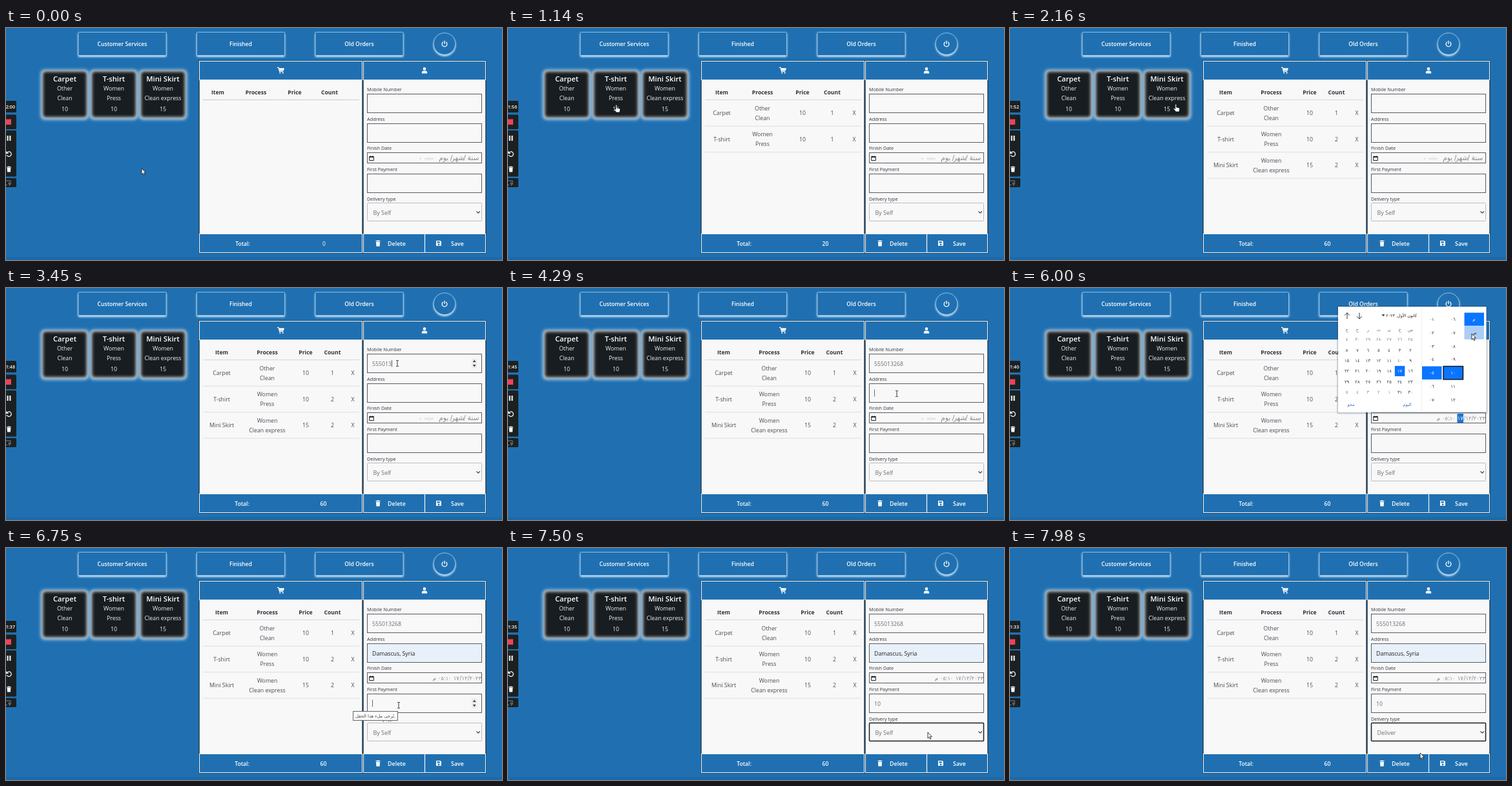
These frames come from a looping animation (768x360 px, 8000 ms). An HTML page:

```html
<!DOCTYPE html>
<html lang="en">
<head>
<meta charset="utf-8">
<title>Laundry order</title>
<style>
html, body { margin: 0; width: 100%; height: 100%; overflow: hidden; background: #2070b1; }
svg { display: block; width: 768px; height: 360px; font-family: 'Open Sans', 'Noto Sans', sans-serif; }
.ar { font-family: 'DejaVu Sans', sans-serif; }
.btn { fill: #2070b1; stroke: #a5cdec; stroke-width: .8; filter: drop-shadow(.8px 2px 1.8px #d3ebfc); }
.halo { fill: #bfe1f8; filter: blur(2.6px); }
.rim { fill: #bdb8b5; filter: blur(1.2px); }
.core { fill: #171d20; filter: blur(2.2px); }
.shade { fill: none; stroke: #26384a; filter: blur(1px); }
</style>
</head>
<body>
<svg viewBox="0 0 768 360" xmlns="http://www.w3.org/2000/svg">
  <g id="base"></g>
  <g id="live"></g>
</svg>
<script>
const LOOP = 8000;
const BLUE = '#2070b1', PAPER = '#f8f8f9', INK = '#4a4d52', DARK = '#1b2123', PICK = '#0a75ff';
const PHONE = '555013268';

// Markup helpers; y is the visual middle of the line
const text = (x, y, s, size, fill, o = {}) =>
  `<text x="${x}" y="${(y + size * 0.36).toFixed(2)}" font-size="${size}" fill="${fill}" ` +
  `font-weight="${o.w || 400}" text-anchor="${o.a || 'middle'}" class="${o.c || ''}">${s}</text>`;
const arab = (x, y, s, size, fill = '#333', a = 'middle') => text(x, y, s, size, fill, { c: 'ar', a });
const rect = (x, y, w, h, fill, more = '') =>
  `<rect x="${x}" y="${y}" width="${w}" height="${h}" fill="${fill}" ${more}/>`;
const path = (d, more) => `<path d="${d}" ${more}/>`;
const at = (x, y, body, k = 1) => `<g transform="translate(${x} ${y}) scale(${k})">${body}</g>`;
const line = (x1, y1, x2, y2, stroke, w = 1) => path(`M${x1} ${y1}L${x2} ${y2}`, `stroke="${stroke}" stroke-width="${w}"`);
const digits = (n, pad = 1) =>
  String(n).padStart(pad, '0').replace(/\d/g, d => String.fromCharCode(0x660 + +d));

const trash = path('M-4-4.4h2.4l.6-.8h2l.6.8h2.4v1.2h-8zM-3.4-2.6h6.8l-.5 7.2q0 .7-.8.7h-4.2q-.8 0-.8-.7z', 'fill="#fff"');
const icons = {
  cart: path('M-5.5-4.5h2l1.6 6.2h5.6', 'fill="none" stroke="#fff" stroke-width="1.2"') +
    path('M-3-3.6h8.5l-1.3 4.4h-6.1z', 'fill="#fff"') +
    '<circle cx="-1.2" cy="3.8" r="1.1" fill="#fff"/><circle cx="3.2" cy="3.8" r="1.1" fill="#fff"/>',
  user: '<circle cy="-2.4" r="2.3" fill="#fff"/>' + path('M-4.2 4.6v-1q0-2.8 2.8-2.8h2.8q2.8 0 2.8 2.8v1z', 'fill="#fff"'),
  disk: path('M-4-4h6.4l1.6 1.6v6.4h-8zM-2.6-2.8v2.2h4.4v-2.2zM0 .6a1.4 1.4 0 1 0 .01 0z', 'fill="#fff" fill-rule="evenodd"'),
  power: path('M-2.5-2.8a3.9 3.9 0 1 0 5 0M0-4.6v4.2', 'fill="none" stroke="#fff" stroke-width="1.3" stroke-linecap="round"'),
  undo: path('M-3.2-1.6a3.7 3.7 0 1 1-.2 3M-3.8-4.2v3h3', 'fill="none" stroke="#fff" stroke-width="1.2"'),
  date: path('M-3.3-2.8h6.6v6h-6.6zM-1.8-4v1.4M1.8-4v1.4', 'fill="none" stroke="#222"') + rect(-3.3, -3, 6.6, 1.6, '#222'),
};

const items = [
  { name: 'Carpet', kind: 'Other', job: 'Clean', price: 10, x: 91, clicks: [640] },
  { name: 'T-shirt', kind: 'Women', job: 'Press', price: 10, x: 167, clicks: [1080, 1300] },
  { name: 'Mini Skirt', kind: 'Women', job: 'Clean express', price: 15, x: 243, clicks: [1760, 1980] },
];

function button(cx, label) {
  return rect(cx - 68, 6.5, 136, 36, BLUE, 'rx="1" class="btn"') +
    text(cx, 24.5, label, 8.65, '#fff', { w: 600 });
}

function card({ x, name, kind, job, price }) {
  return rect(x - 37, 65, 74, 77, '', 'rx="6" class="halo"') +
    rect(x - 35.5, 66, 71, 74, '', 'rx="5" class="rim"') +
    rect(x - 33.5, 68, 67, 70, '', 'rx="4" class="core"') +
    text(x, 79, name, 11.2, '#fff', { w: 600 }) +
    [[kind, 93.5], [job, 108.5], [price, 125.5]].map(([s, y]) => text(x, y, s, 8.85, '#f2f2f2')).join('');
}

function panel(x, w) {
  const edge = 'stroke="#f4f8fb" stroke-width="1"';
  return rect(x - .3, 50.7, w + .6, 298.6, 'none', 'stroke="#1c3d5a" stroke-width=".8"') +
    rect(x + .4, 80, w - .8, 240, PAPER, 'stroke="#50555a" stroke-width=".8"') +
    rect(x + .5, 51.5, w - 1, 29, BLUE, edge) +
    rect(x + .5, 319.5, w - 1, 29, BLUE, edge);
}

function toolbar() {
  const bar = (y, h) => rect(-6, y, 22, h, DARK, 'rx="1.5"');
  return bar(113, 18) + bar(134.5, 22.5) + bar(159, 71.5) + bar(233, 14) +
    rect(-1, 141.5, 9, 8.5, '#f0415a') +
    rect(1.6, 167, 2, 8, '#fff') + rect(5.4, 167, 2, 8, '#fff') +
    at(4.5, 195.5, icons.undo) + at(4.5, 219, trash, .85) +
    path('M-1 237h8v3M-1 243.5h3M4 240l4 1.6-2 .8-.6 2z', 'fill="none" stroke="#8b9090" stroke-width=".9"');
}

const fieldBox = (y, h, fill = PAPER) => rect(559.5, y, 177, h, fill, 'stroke="#595c60" stroke-width="1"');

function drawBase() {
  const labels = { 'Mobile Number': 95.5, 'Address': 141, 'Finish Date': 186.5, 'First Payment': 219, 'Delivery type': 265 };
  return rect(0, 0, 768, 360, BLUE) + rect(0, 355.5, 768, 4.5, '#1d69a8') +
    button(180, 'Customer Services') + button(363.5, 'Finished') + button(547, 'Old Orders') +
    '<circle cx="679" cy="24.5" r="16.8" class="btn"/>' + at(679, 24.8, icons.power) +
    items.map(card).join('') + toolbar() +
    panel(299, 253) + panel(553, 190) +
    at(425.5, 65.8, icons.cart) + at(648, 65.8, icons.user) +
    line(648.5, 320, 648.5, 348, '#f4f8fb', 1.2) +
    at(576, 334, trash, .9) + text(605, 334.5, 'Delete', 8.9, '#fff', { w: 600 }) +
    at(670, 334, icons.disk) + text(699, 334.5, 'Save', 8.9, '#fff', { w: 600 }) +
    Object.entries(labels).map(([s, y]) => text(559, y, s, 7.35, '#30343a', { a: 'start' })).join('') +
    fieldBox(102.5, 29) + fieldBox(148.5, 29) + fieldBox(193.5, 16) + fieldBox(226.5, 29) +
    at(566, 202.3, icons.date);
}

const layouts = [[328, 387, 447, 501, 0], [329, 390, 453, 501, 536], [331, 394, 456, 502, 536], [334, 404.5, 464, 505.5, 537]];

function drawCart(t) {
  const rows = items.map(i => ({ ...i, n: i.clicks.filter(c => t >= c).length })).filter(i => i.n);
  const cols = layouts[rows.length];
  const total = rows.reduce((sum, r) => sum + r.n * r.price, 0);
  let out = ['Item', 'Process', 'Price', 'Count']
    .map((s, i) => text(cols[i], 99.5, s, 8.6, '#2f3338', { w: 700 })).join('');
  out += line(305, 111.5, 547, 111.5, rows.length ? '#d4d7da' : '#c9ccd0');
  rows.forEach((r, i) => {
    const y = 132 + i * 40.4;
    const cell = (c, dy, s) => text(cols[c], y + dy, s, 8.75, INK);
    out += cell(0, 0, r.name) + cell(1, -7.2, r.kind) + cell(1, 7.8, r.job) +
      cell(2, 0, r.price) + cell(3, 0, r.n) + cell(4, 0, 'X') +
      line(305, y + 20.3, 547, y + 20.3, '#dcdee1');
  });
  const dx = rows.length ? -1 : 0;
  return out + text(366.5 + dx, 334.5, 'Total:', 8.6, '#fff', { w: 600 }) +
    text(492.5 + dx, 334.5, total, 8.6, '#fff', { w: rows.length ? 600 : 400 });
}

const within = (t, a, b) => t >= a && t < b;
const typed = (s, t, start, step) => s.slice(0, Math.max(0, Math.floor((t - start) / step)));
const caret = (x, y) => line(x, y - 5.5, x, y + 5.5, '#444', .8);
const spinner = y => rect(721, y - 7.5, 8.5, 15, '#ececee') +
  path(`M722.8 ${y - 2}l2.4-3.6 2.4 3.6zM722.8 ${y + 2}l2.4 3.6 2.4-3.6z`, 'fill="#444"');

function drawDate(t) {
  const grey = '#85878a', y = 202, size = 8.6;
  const picking = t < 6380;
  let out = '';
  if (t >= 5450) {
    if (picking) out += rect(692.5, 195, 9.5, 14, '#1a72d2');
    out += arab(736, y, `/${digits(12)}/${digits(2023)}`, size, grey, 'end') +
      arab(697.3, y, digits(17), size, picking ? '#fff' : grey);
  } else {
    const on = t >= 4930;
    if (on) out += rect(667.5, 195, 20.5, 14, '#1a72d2');
    out += [['سنة', 723.5], ['/', 710], ['شهر', 699.5], ['/', 689.5]].map(([s, x]) => arab(x, y - .5, s, 10.6, grey)).join('') +
      arab(677.7, y - .5, 'يوم', 10.6, on ? '#fff' : grey);
  }
  return out + (t >= 5860
    ? arab(689.5, y, `${digits(5, 2)}:${digits(10)}`, 8.2, grey, 'end') + arab(663.5, y - .5, 'م', 8.6, grey)
    : arab(655, y, '--:--', 7.6, grey) + arab(641.5, y, '-', 7.6, grey));
}

function drawForm(t) {
  const entry = (y, s) => text(567, y, s, 8.75, '#6a6d71', { a: 'start' });
  const phone = typed(PHONE, t, 2780, 110);
  const paid = typed('10', t, 6860, 110);
  let out = entry(117.5, phone) + entry(241.5, paid) + drawDate(t);
  if (within(t, 2720, 4110)) out += caret(567.5 + phone.length * 5, 117) + spinner(117);
  if (within(t, 4110, 4500)) out += caret(567.5, 163);
  if (t >= 4500) out += fieldBox(148.5, 29, '#e8f0fa') + text(567, 163.5, 'Damascus, Syria', 8.75, '#222', { a: 'start' });
  if (within(t, 6560, 7430)) out += caret(567.5 + paid.length * 5, 241) + spinner(241);
  const focus = t >= 7430;
  out += rect(559.5, 271.5, 177, 28, PAPER, `rx="1" stroke="${focus ? '#1c1e20' : '#b9bcbf'}" stroke-width="${focus ? 1.5 : 1}"`) +
    text(568.5, 286.5, t < 7780 ? 'By Self' : 'Deliver', 8.9, '#6a6d71', { a: 'start' }) +
    path('M728.5 284.5l2.7 2.7 2.7-2.7', 'fill="none" stroke="#444" stroke-width="1.2"');
  if (within(t, 6650, 7000)) {
    out += rect(537.5, 253.5, 69, 14, '#fcfcfc', 'stroke="#666" stroke-width="1"') +
      arab(572, 260.5, 'يُرجى ملء هذا الحقل.', 6.8, '#444');
  }
  return out;
}

function drawPicker(t, cur) {
  if (!within(t, 5030, 6380)) return '';
  const fade = Math.min(1, Math.max(0, (t - 5050) / 90));
  const shade = rect(508, 29.5, 229.5, 164, '', `class="shade" stroke-width="2" opacity="${.16 + fade * .3}"`);
  let out = rect(508, 29, 229.5, 164, '#fff') +
    path('M522 48v-9.5m-3.8 4l3.8-4 3.8 4M541 38.5v9.5m-3.8-4l3.8 4 3.8-4', 'fill="none" stroke="#333" stroke-width="1"') +
    path('M575.5 41h5l-2.5 3z', 'fill="#333"') +
    arab(630, 42.5, `كانون الأول, ${digits(2023)}`, 6.4, '#222', 'end') +
    line(637.5, 30, 637.5, 193, '#f0f0f0');
  [...'سحنثرخج'].forEach((s, i) => out += arab(620 - i * 16.4, 64.5, s, 6.6, '#666'));
  for (let i = 0; i < 42; i++) {
    const n = i < 6 ? 25 + i : i < 37 ? i - 5 : i - 36;
    const x = 620 - (i % 7) * 16.4, y = 80 + Math.floor(i / 7) * 16.3;
    const on = n === 17 && t >= 5450;
    if (on) out += rect(x - 7.8, y - 8, 15.5, 16, PICK);
    out += arab(x, y, digits(n), 6.8, on ? '#fff' : i < 6 || i > 36 ? '#888' : '#333');
  }
  out += arab(615, 180.5, 'اليوم', 6.4, '#2a6fc4') + arab(528, 180.5, 'محو', 6.4, '#2a6fc4');
  const slot = (x, y, s, on, more = '') => (on ? rect(x - 15, y - 10.2, 30.5, 20.4, on, more) : '') +
    arab(x, y, s, 7, on === PICK ? '#fff' : '#333');
  for (let i = 0; i < 7; i++) {
    const y = 48.5 + i * 20.8;
    out += slot(653, y, digits(i + 1, 2), i === 4 && t >= 5700 && PICK) +
      slot(686, y, digits(i + 6, 2), i === 4 && t >= 5860 && PICK, 'stroke="#111" stroke-width="1.4"');
  }
  const hover = cur.x > 703 && within(cur.y, 59, 80);
  out += slot(718.5, 48.5, 'م', PICK) + slot(718.5, 69.5, 'ص', hover && '#a9cdf6');
  return shade + `<g opacity="${fade}">${out}</g>`;
}

// Pointer stops: time, x, y
const stops = [
  [0, 210, 218], [150, 210, 218], [540, 97, 118], [740, 97, 118], [980, 168, 119], [1400, 168, 119],
  [1650, 257, 118], [2230, 257, 118], [2680, 606, 117], [3850, 606, 117], [4080, 602, 164], [4650, 602, 164],
  [4860, 567, 202], [4950, 567, 202], [5040, 573, 221], [5380, 606, 128], [5480, 606, 128], [5640, 655, 131],
  [5720, 655, 131], [5820, 688, 131], [5880, 688, 131], [5985, 715, 71], [6200, 715, 71], [6520, 608, 244],
  [7130, 608, 244], [7380, 650, 286], [7540, 650, 286], [7720, 625, 310], [7800, 625, 310], [7970, 635, 318],
];

function pointer(t) {
  const i = stops.findIndex(s => s[0] > t);
  if (i < 0) return { x: 635, y: 318 };
  const [a, ax, ay] = stops[i - 1], [b, bx, by] = stops[i];
  const u = (t - a) / (b - a), e = u * u * (3 - 2 * u);
  return { x: ax + (bx - ax) * e, y: ay + (by - ay) * e };
}

function drawPointer(t, { x, y }) {
  const picking = within(t, 5050, 6380) && x > 508 && y < 193;
  const onCard = within(y, 66, 140) && items.some(i => Math.abs(x - i.x) < 36);
  const onField = !picking && within(x, 559, 737) && (within(y, 102, 132) || within(y, 148, 178) || within(y, 226, 256));
  const pen = 'fill="#fff" stroke="#111" stroke-width=".8" stroke-linejoin="round"';
  if (onCard) return at(x, y, path('M-1.2 1q0-1 1-1t1 1v4l4 1q1 .3 .9 1.4l-.7 4.6h-5.2l-3.6-4.6q-.4-1.2 1-1l1.6 1.2z', pen));
  if (onField) return at(x, y, path('M-2-4.5h1.4l.6.6.6-.6h1.4M0-4v8M-2 4.5h1.4l.6-.6.6.6h1.4', 'fill="none" stroke="#222" stroke-width=".9"'));
  return at(x, y, path('M0 0v9.2l2.1-1.9 1.5 3.3 1.5-.7-1.5-3.2h2.8z', pen));
}

function clock(t) {
  const s = Math.floor(120.15 - 3.35 * t / 1000);
  return text(14, 122.5, `0${Math.floor(s / 60)}:${String(s % 60).padStart(2, '0')}`, 7.2, '#fff', { w: 600, a: 'end' });
}

const base = document.getElementById('base');
const live = document.getElementById('live');
base.innerHTML = drawBase();

function render(t) {
  const cur = pointer(t);
  live.innerHTML = clock(t) + drawCart(t) + drawForm(t) + drawPicker(t, cur) + drawPointer(t, cur);
}

const start = performance.now();
function tick() {
  render((performance.now() - start) % LOOP);
  requestAnimationFrame(tick);
}
tick();
</script>
</body>
</html>
```
